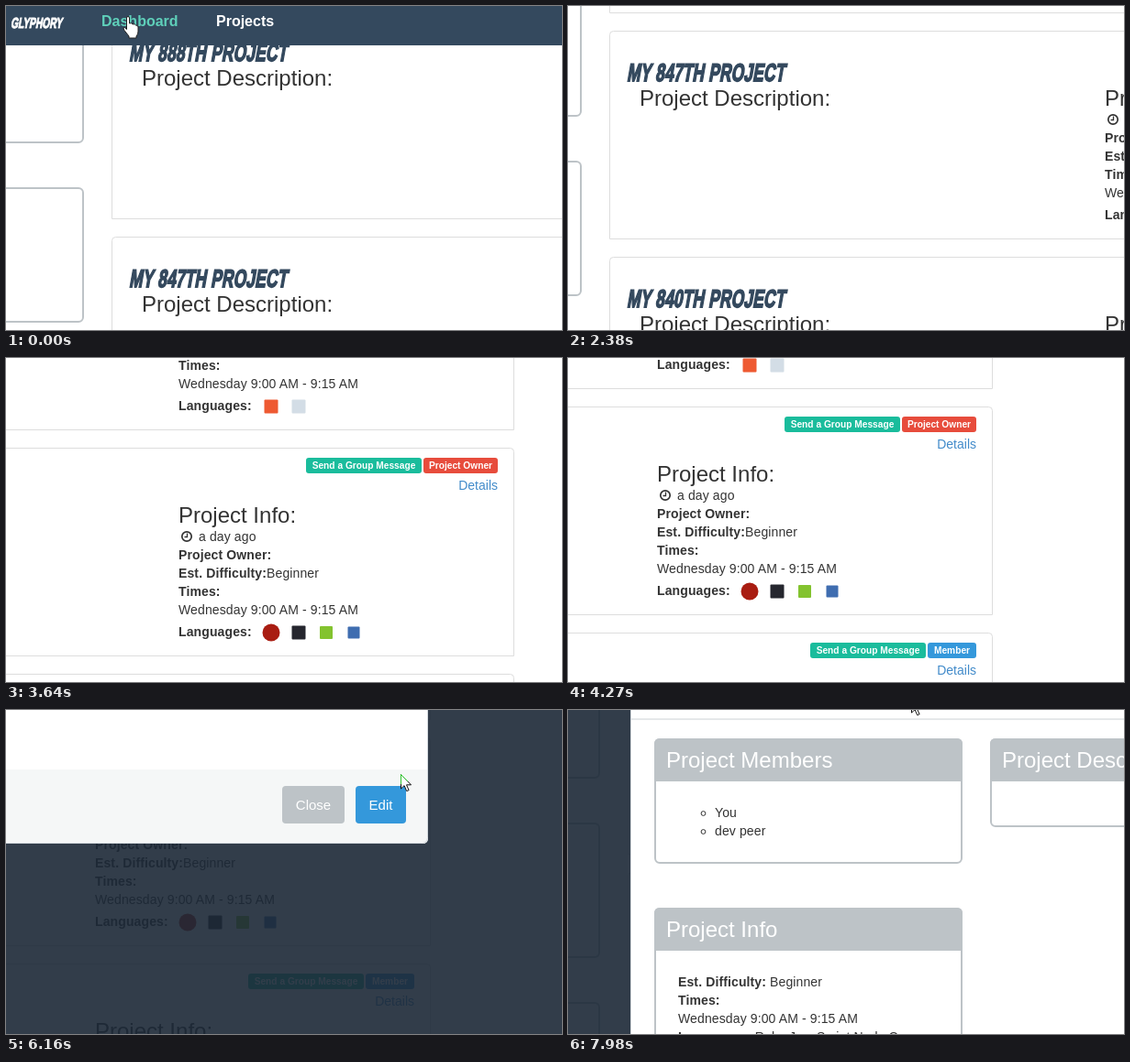
These frames come from a looping animation (606x354 px, 8000 ms). An HTML page:

```html
<!DOCTYPE html>
<html lang="en">
<head>
<meta charset="utf-8">
<title>Project dashboard</title>
<style>
html, body { margin: 0; width: 100%; height: 100%; overflow: hidden; background: #fff; }
svg { display: block; width: 100vw; height: 100vh; }
text { font: 14px "Liberation Sans", Arial, sans-serif; fill: #333; letter-spacing: .12px; white-space: pre; }
.b { font-weight: bold; }
.h { font-size: 24px; letter-spacing: 0; }
.nav { font-size: 16px; font-weight: bold; fill: #fff; letter-spacing: 0; }
.comic { font-size: 27px; font-weight: bold; fill: #34495e; stroke: #34495e; stroke-width: 1.8px; letter-spacing: .35px; }
.logo { font-size: 16px; fill: #fff; stroke: #fff; stroke-width: 1.1px; letter-spacing: 0; }
.label { font-size: 10.2px; font-weight: bold; fill: #fff; letter-spacing: 0; text-anchor: middle; }
.btn { font-size: 15px; fill: #fff; letter-spacing: 0; text-anchor: middle; }
.white { fill: #fff; }
.link { fill: #428bca; text-anchor: end; letter-spacing: 0; }
.link.over { fill: #2a6496; text-decoration: underline; }
</style>
</head>
<body>
<svg id="stage" viewBox="0 0 606 354"></svg>
<script>
const LOOP = 8000, STEP = 70;
const GREY = '#bdc3c7', GREEN = '#1abc9c', BLUE = '#3498db', RED = '#e74c3c';

// Drawing helpers
const text = (x, y, s, cls = '', extra = '') =>
  `<text x="${x}" y="${y}" class="${cls}" ${extra}>${s}</text>`;
const bold = s => `<tspan class="b">${s}</tspan>`;
const rect = (x, y, w, h, fill, rx = 0, extra = '') =>
  `<rect x="${x}" y="${y}" width="${w}" height="${h}" rx="${rx}" fill="${fill}" ${extra}/>`;
const comic = (x, y, s, cls = '') =>
  `<text class="comic ${cls}" transform="translate(${x} ${y}) skewX(-10) scale(.64 1)">${s}</text>`;

function label(right, y, w, s, fill, extra = '') {
  return rect(right - w, y, w, 17, fill, 3, extra) + text(right - w / 2, y + 12, s, 'label');
}

// Plain marks stand for the language icons: [colour, size, round]
const ICONS = {
  swift: ['#ee5a32', 15], java: ['#d3dde6', 15],
  ruby: ['#a91d12', 19, 1], js: ['#25262e', 15], node: ['#83c32f', 14], c: ['#3f6db0', 13]
};
function icon(name, i, y) {
  const [fill, size, round] = ICONS[name];
  return rect(756 + i * 30 - size / 2, y - size / 2, size, size, fill, round ? size / 2 : 1);
}

function card(y, number, level, role, icons, id = '') {
  const owner = role === 'Project Owner', w = owner ? 81 : 53;
  const rows = ['', bold('Project Owner:'), bold('Est. Difficulty:') + level,
    bold('Times:'), 'Wednesday 9:00 AM - 9:15 AM'];
  return `<path d="M115.5 ${y + 227.5}v-223q0-4 4-4H1016.5q4 0 4 4v223z" fill="#fff" stroke="#ddd"/>` +
    comic(134, y + 55, `MY ${number}TH PROJECT`) +
    text(148, y + 82, 'Project Description:', 'h') +
    label(1003, y + 11, w, role, owner ? RED : BLUE) +
    label(1001 - w, y + 11, 126, 'Send a Group Message', GREEN, id && `id="${id}Send"`) +
    text(1003, y + 46, 'Details', 'link', id && `id="${id}Link"`) +
    text(655, y + 82, 'Project Info:', 'h') +
    `<circle cx="664" cy="${y + 97}" r="5.2" fill="none" stroke="#333" stroke-width="1.7"/>` +
    `<path d="M664.5 ${y + 93.5}v4h-3" fill="none" stroke="#333" stroke-width="1.3"/>` +
    text(677, y + 102, 'a day ago') +
    rows.map((s, i) => text(655, y + 102 + i * 20, s)).join('') +
    text(655, y + 206, 'Languages:', 'b') +
    icons.split(' ').map((n, i) => icon(n, i, y + 202)).join('');
}

function panel(x, y, w, h, title) {
  return rect(x + 1, y + 1, w - 2, h - 2, '#fff', 5, `stroke="${GREY}" stroke-width="2"`) +
    `<path d="M${x} ${y + 47}v-41q0-6 6-6h${w - 12}q6 0 6 6v41z" fill="${GREY}"/>` +
    text(x + 13, y + 32, title, 'h white');
}

const sideBoxes = [3, 199, 395, 591, 787].map(y =>
  rect(-300, y, 384, 146, '#fff', 5, `stroke="${GREY}" stroke-width="2"`)).join('');

const members = ['You', 'dev peer'].map((s, i) =>
  `<circle cx="197.5" cy="${188 + i * 20}" r="2.4" fill="none" stroke="#333"/>` +
  text(210, 192 + i * 20, s)).join('');

const facts = [bold('Est. Difficulty:') + ' Beginner', bold('Times:'),
  'Wednesday 9:00 AM - 9:15 AM', bold('Languages:') + ' Ruby JavaScript Node C']
  .map((s, i) => text(170, 377 + i * 20, s)).join('');

const page = rect(-300, -100, 1900, 1200, '#fff') + sideBoxes +
  card(5, 888, 'Expert', 'Member', 'swift java') +
  card(252, 847, 'Expert', 'Member', 'swift java') +
  card(499, 840, 'Beginner', 'Project Owner', 'ruby js node c', 'main') +
  card(746, 812, 'Beginner', 'Member', 'ruby js') +
  rect(-300, -60, 1900, 103, '#34495e') +
  comic(5, 24, 'GLYPHORY', 'logo') +
  text(104, 22, 'Dashboard', 'nav', 'id="dash"') +
  text(229, 22, 'Projects', 'nav');

const modal = rect(118, 30, 900, 587, '#fff', 6) +
  rect(118, 84, 900, 2, '#e5e8ea') +
  '<path d="M118 536h900v75q0 6-6 6h-888q-6 0-6-6z" fill="#f5f7f7"/>' +
  rect(118.5, 30.5, 899, 586, 'none', 6, 'stroke="#d3d9de"') +
  rect(859, 554, 68, 41, GREY, 4) + text(893, 580, 'Close', 'btn') +
  rect(939, 554, 55, 41, BLUE, 4) + text(966.5, 580, 'Edit', 'btn') +
  panel(144, 106, 336, 137, 'Project Members') + members +
  panel(510, 106, 482, 97, 'Project Description') +
  panel(144, 291, 336, 177, 'Project Info') + facts;

const hand = `<g id="hand"><path d="M-1.5 2q0-1.5 1.5-1.5t1.5 1.5v6q2.5-1 3.5 1 2.5-1 3.5 1 2.5 0 2.5 2v5
  q0 3-2 5v2h-8v-2l-5.5-7q-1.5-3 1-2.5l2 2z" fill="#fff" stroke="#222"/></g>`;
const arrow = `<g id="arrow"><path d="M.5 .5v15.5l3.6-3.4 2.6 6 2.4-1-2.6-5.8h5z" fill="#fff" stroke="#111"/>
  <path id="edge" d="M.5 11V.5L8 8" fill="none" stroke="#2fc52f"/></g>`;

const $ = id => document.getElementById(id);
$('stage').innerHTML = `<g id="world">${page}` +
  rect(-300, -100, 1900, 1200, '#1c2937', 0, 'id="backdrop"') +
  `<g id="modal">${modal}</g></g>${hand}${arrow}`;

// Tracks: [time, values...]
const CAMERA = [[1540, 0, 0], [1750, 5, 51], [2380, 70, 225], [3010, 187, 385], [3780, 529, 405],
  [3850, 529, 405], [4270, 558, 446], [4410, 558, 469], [6720, 558, 469], [7420, 142, 199],
  [7560, 108, 140], [7980, 50, 75]];
const HAND = [[0, 133, 11], [280, 133, 6]];
const ARROW = [[4620, 300, -22], [4830, 345, 42], [5040, 449, 75], [5180, 449, 75], [5600, 430, 70],
  [6230, 430, 70], [6510, 374, -13]];
const DASH = [[0, 95, 208, 186], [280, 26, 188, 156], [420, 26, 188, 156], [700, 22, 160, 133]];
const BACKDROP = [[5880, 0], [6090, .9]];
const MODAL = [[5880, 0, -135], [5950, .25, -80], [6020, .6, -36], [6090, .9, -12], [6160, 1, -2], [6230, 1, 0]];

function at(track, t) {
  const i = track.findIndex(row => row[0] > t);
  if (i === 0) return track[0].slice(1);
  if (i < 0) return track[track.length - 1].slice(1);
  const a = track[i - 1], b = track[i], k = (t - a[0]) / (b[0] - a[0]);
  return a.slice(1).map((v, j) => v + (b[j + 1] - v) * k);
}
const show = (id, on) => $(id).setAttribute('visibility', on ? 'inherit' : 'hidden');
const move = (id, x, y) => $(id).setAttribute('transform', `translate(${Math.round(x)} ${Math.round(y)})`);

function draw(ms) {
  const t = Math.floor(ms / STEP) * STEP;
  const [cx, cy] = at(CAMERA, t), [opacity, shift] = at(MODAL, t);
  move('world', -cx, -cy);
  move('modal', 0, shift);
  $('modal').setAttribute('opacity', opacity);
  $('backdrop').setAttribute('opacity', at(BACKDROP, t)[0]);
  $('dash').style.fill = t < 1470 ? `rgb(${at(DASH, t).map(Math.round)})` : '#fff';
  move('hand', ...at(HAND, t));
  show('hand', t < 1470);
  move('arrow', ...at(ARROW, t));
  show('arrow', t >= 4690);
  show('edge', t >= 5950 && t < 6300);
  $('mainSend').setAttribute('fill', t >= 4760 && t < 4900 ? '#48c9b0' : GREEN);
  $('mainLink').classList.toggle('over', t >= 5390);
}

const start = performance.now();
function tick() {
  draw((performance.now() - start) % LOOP);
  requestAnimationFrame(tick);
}
tick();
</script>
</body>
</html>
```
